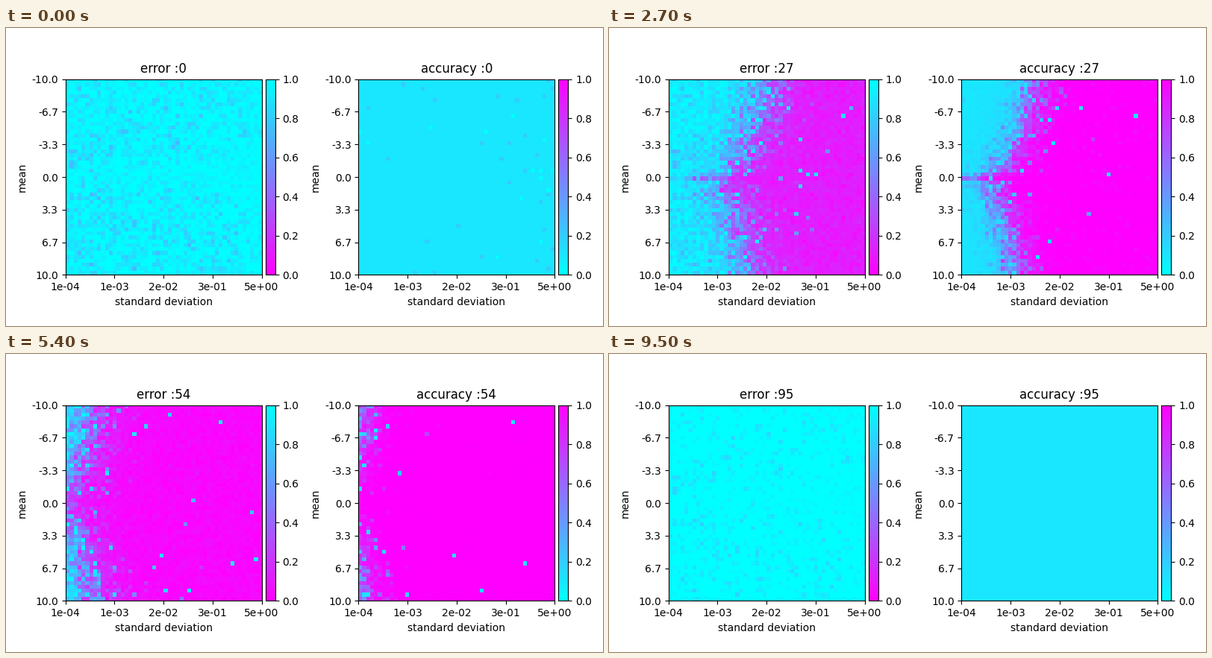
These frames come from a looping animation (800x400 px, 9.6 s). A matplotlib script:

```python
import numpy as np
import matplotlib.pyplot as plt
from matplotlib.animation import FuncAnimation

W, H = 800, 400
FRAMES, STEP = 96, 100
COLLAPSE = 60          # from here on no network learns any more
N = 50

plt.rcParams["font.family"] = "DejaVu Sans"

row, col = np.mgrid[0:N, 0:N].astype(float)
upper = row < 24.5
dist = np.where(upper, 24 - row, row - 25) / 24
centre = np.abs(row - 24.5)

rng = np.random.default_rng(7)
grain = rng.normal(size=(N, N))
pace = rng.normal(size=(N, N))
odd = rng.random((N, N)) < 0.008 + 0.1 * (col / N) ** 8


def sigmoid(x):
    return 1 / (1 + np.exp(-np.clip(x, -40, 40)))


def bump(t, mid, width, power=2):
    return np.exp(-np.abs((t - mid) / width) ** power)


def front(t):
    """Column where learning sets in; each half swings back once."""
    edge = 30 - 0.44 * t + 35 * np.exp(-t / 2.5)
    swing = np.where(upper, 17 * bump(t, 33, 6), 4 * bump(t, 20, 7))
    depth = np.where(upper, 10 + 0.45 * swing, 10)
    return edge + swing - depth * (1 - dist ** 0.45)


def initial_noise(scale, shift):
    wedge = sigmoid((centre - (col - 8) / 7) * 0.8)
    fade = (0.35 + 0.65 * wedge) * sigmoid((50 - col) / 3)
    return np.maximum(0, scale * grain + shift) * fade


def untrained():
    lone = np.where(grain > 0.3, 0.0, 0.2)
    return 1 - initial_noise(0.085, 0.05), np.where(odd, lone, 0.1)


def collapsed():
    return 1 - initial_noise(0.075, -0.02), np.full((N, N), 0.1)


def training(t):
    local = np.random.default_rng(100 + t)
    wobble = local.normal(size=(N, N))
    late = np.abs(local.standard_t(2, size=(N, N))) - 1
    lag = 1.7 * pace + 1.7 * local.normal(size=(N, N)) + 1.8 * late
    ahead = col - front(t)
    pulse = bump(t, 16, 7, 6)

    loss = 0.02 + 0.85 * np.exp(-t / 12)
    floor = loss + 0.12 * pulse * bump(centre, 0, 3)
    done = sigmoid((ahead - lag) / 2.8)
    start = 0.98 - initial_noise(0.085, 0.05)
    err = start + (floor - start) * done
    err += (0.015 + 0.11 * loss) * wobble * (0.4 + 0.6 * done)
    bar = 0.52 * pulse * sigmoid((40 - col) / 1.5) * sigmoid((col - 14) / 2)
    err = np.where(centre < 1, np.maximum(err, bar + 0.03 * wobble), err)

    lead = 6 * min(t / 25, 1)
    acc = 0.1 + 0.9 * sigmoid((ahead + lead - 0.7 * lag) / 2)
    acc += 0.05 * np.maximum(0, np.abs(grain) - 1.4) * (acc < 0.3)
    acc -= 0.3 * loss * np.maximum(0, wobble - 0.7) * (acc > 0.8)
    rod = 0.4 * pulse * sigmoid((col - 7) * 3) + 0.06 * wobble
    acc = np.where((centre < 1.6) & (col > 6), np.maximum(acc, rod), acc)
    return np.clip(err, 0, 1), np.clip(acc, 0, 1)


def fields(i):
    if i == 0:
        return untrained()
    return collapsed() if i >= COLLAPSE else training(i)


fig = plt.figure(figsize=(W / 100, H / 100), dpi=100, facecolor="white")
SIDE = 262.75
TOP = (H - SIDE) / 2


def axes_px(x, w):
    return fig.add_axes([x / W, TOP / H, w / W, SIDE / H])


def panel(x, cmap):
    ax = axes_px(x, SIDE)
    im = ax.imshow(np.zeros((N, N)), cmap=cmap, vmin=0, vmax=1,
                   aspect="auto", interpolation="nearest")
    ax.set_xticks(np.linspace(0, N, 5) - 0.5,
                  ["1e-04", "1e-03", "2e-02", "3e-01", "5e+00"])
    ax.set_yticks(np.linspace(0, N, 7) - 0.5,
                  [f"{m:.1f}" for m in np.linspace(-10, 10, 7)])
    ax.set_xlabel("standard deviation")
    ax.set_ylabel("mean")
    fig.colorbar(im, cax=axes_px(x + SIDE + 5, SIDE * 0.05))
    return im, ax.set_title("")


err_im, err_title = panel(79.75, "cool_r")
acc_im, acc_title = panel(472.45, "cool")


def update(i):
    err, acc = fields(i)
    err_im.set_data(err)
    acc_im.set_data(acc)
    err_title.set_text(f"error :{i}")
    acc_title.set_text(f"accuracy :{i}")
    return err_im, acc_im, err_title, acc_title


anim = FuncAnimation(fig, update, frames=FRAMES, interval=STEP,
                     repeat=True, repeat_delay=0, blit=False)
plt.show()
```
